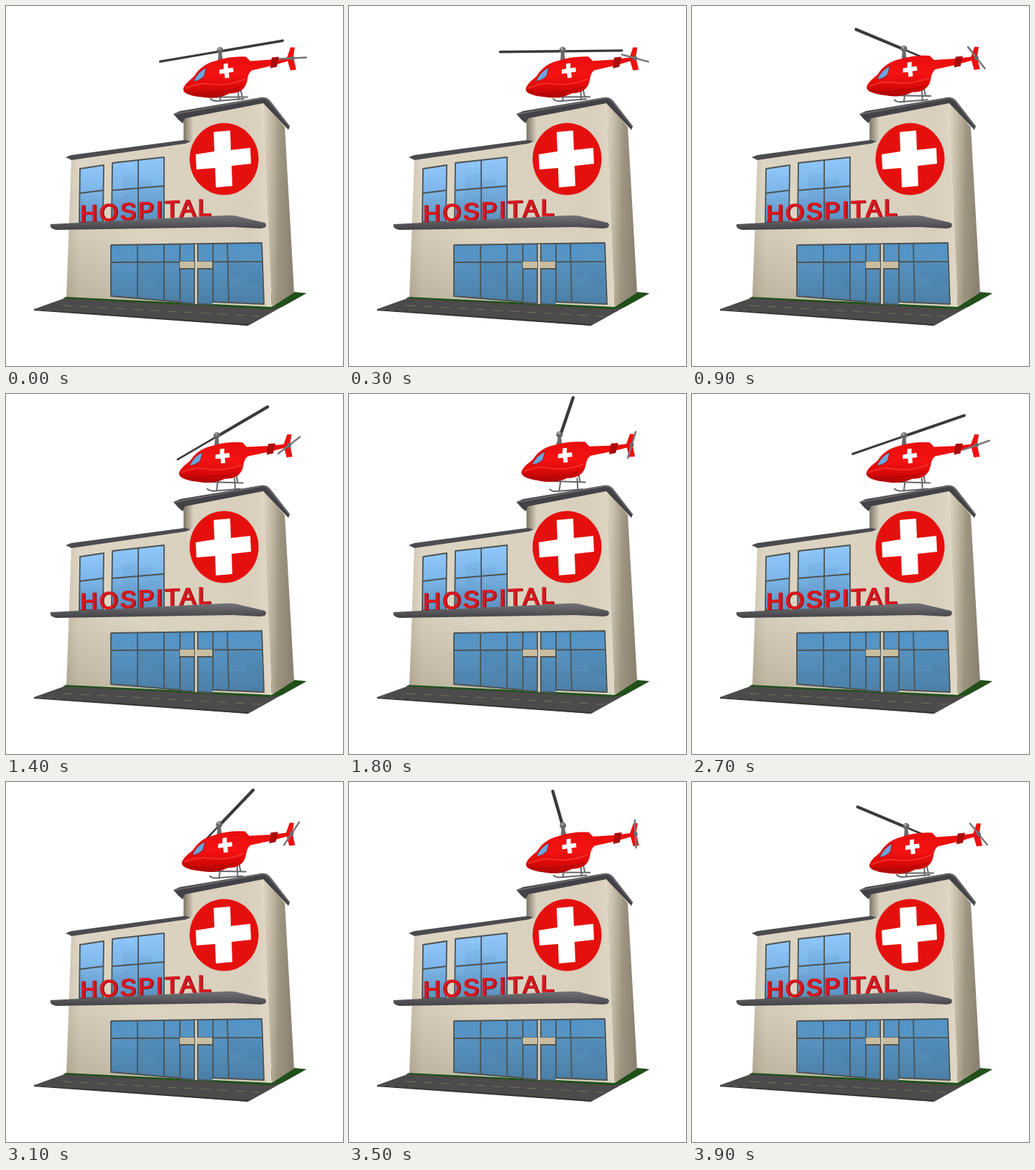
An HTML page for the animation above (4000 ms loop, 469 by 500 pixels).

```html
<!DOCTYPE html>
<html lang="en">
<head>
<meta charset="utf-8">
<title>Hospital helicopter</title>
<style>
  html, body { margin: 0; width: 100%; height: 100%; overflow: hidden; background: #fff; }
  svg { display: block; width: 469px; height: 500px; }
  .frame { fill: none; stroke: #4d5353; stroke-width: 1.8; stroke-linejoin: round; }
  .skid { fill: none; stroke: #66666a; stroke-width: 2; stroke-linecap: round; }
  .sign { font: 33px "Liberation Sans", Arial, sans-serif; letter-spacing: 3px; stroke-width: 1.2; }
</style>
</head>
<body>
<svg viewBox="0 0 469 500">
  <defs>
    <linearGradient id="wall">
      <stop offset="0" stop-color="#cdc4b0"/><stop offset=".06" stop-color="#ddd5c3"/>
      <stop offset=".9" stop-color="#d8cfbc"/><stop offset="1" stop-color="#e0d8c6"/>
    </linearGradient>
    <linearGradient id="side" y2=".12">
      <stop offset="0" stop-color="#e0d8c6"/><stop offset=".25" stop-color="#c9bfab"/>
      <stop offset=".6" stop-color="#9d9480"/><stop offset="1" stop-color="#8a8371"/>
    </linearGradient>
    <linearGradient id="corner">
      <stop offset="0" stop-color="#5d5648" stop-opacity=".75"/><stop offset="1" stop-color="#5d5648" stop-opacity="0"/>
    </linearGradient>
    <linearGradient id="dusk" y1="1" x2=".7" y2="0">
      <stop offset="0" stop-color="#6b6046" stop-opacity=".3"/><stop offset="1" stop-color="#6b6046" stop-opacity="0"/>
    </linearGradient>
    <linearGradient id="sky" x2="0" y2="1">
      <stop offset="0" stop-color="#92c8fb"/><stop offset=".45" stop-color="#7db6e9"/>
      <stop offset="1" stop-color="#5c92c0"/>
    </linearGradient>
    <linearGradient id="glass" x2="0" y2="1">
      <stop offset="0" stop-color="#5293c8"/><stop offset=".3" stop-color="#5894c2"/>
      <stop offset="1" stop-color="#4b7ea6"/>
    </linearGradient>
    <linearGradient id="slab" x2="0" y2="1">
      <stop offset="0" stop-color="#727277"/><stop offset=".5" stop-color="#5b5b60"/>
      <stop offset="1" stop-color="#424246"/>
    </linearGradient>
    <linearGradient id="red" x2="0" y2="1">
      <stop offset="0" stop-color="#e80d0d"/><stop offset=".45" stop-color="#f51212"/>
      <stop offset=".75" stop-color="#dc0909"/><stop offset="1" stop-color="#ad0505"/>
    </linearGradient>
  </defs>

  <path id="farSkid" class="skid" d="M288 126L336 126M294 117L292 126M326 113L329 126"/>
  <path id="nearSkid" class="skid" d="M285 129Q288 132 293 132L331 129M300 117L298 132M323 114L324 130"/>
  <g id="rotor" stroke="#3a3a3c" stroke-linecap="round">
    <line id="bladeA"/><line id="bladeB"/>
  </g>
  <g id="body">
    <path d="M296 62L295 75L302 75L300 62Z" fill="#6a6a6d"/>
    <circle cx="298" cy="61" r="4.500" fill="#66666a"/><circle cx="297" cy="59" r="2" fill="#a4a4a8"/>
    <path d="M391 72L396 57L402 57L400 71L404 88L396 89Z" fill="#ee1111"/>
    <path d="M247 114C250 106 257 102 262 97C268 87 278 79 291 76Q311 69 334 70L340 76L368 74L399 70L399 74L372 82L342 89Q337 93 336 102C334 115 325 121 311 121C298 128 284 128 272 126Q259 125 251 121Q246 118 247 114Z" fill="url(#red)"/>
    <path d="M250 114Q270 105 285 108Q309 111 333 101" fill="none" stroke="#ff5148" stroke-width="2" opacity=".5"/>
    <path d="M251 119Q276 125 292 118Q311 119 327 112" fill="none" stroke="#a60606" stroke-width="2" opacity=".5"/>
    <path d="M261 104Q267 90 279 85L276 97Q269 104 261 104Z" fill="#6ba5dc" stroke="#a81818"/>
    <path d="M370 71L380 70L377 84L368 86Z" fill="#a90b0b"/>
    <path d="M303 80L309 79L309 86L316 85L317 91L310 92L311 99L305 100L304 93L297 94L297 88L303 87Z" fill="#fff"/>
    <g id="tail" stroke-linecap="round">
      <line x1="-19" x2="19" stroke="#77777b" stroke-width="2.5"/><circle r="3" fill="#69696d"/>
    </g>
  </g>

  <path d="M39 421L84 405L404 398L418 399L337 444Z" fill="#4c4a4a"/>
  <path d="M39 421L337 442V444L39 423Z" fill="#353434"/>
  <path d="M80 416L354 431" stroke="#77715d" stroke-dasharray="13 11"/>
  <path d="M79 406L86 403L360 414L400 397L418 399L384 418L366 421Z" fill="#21501b"/>

  <path d="M91 211L248 189V154L357 132L370 418L84 404Z" fill="url(#wall)"/>
  <path d="M357 132L388 168L401 398L370 418Z" fill="url(#side)"/>
  <path d="M247 152L261 149V187L247 189Z" fill="url(#corner)"/>
  <path d="M88 310H210V409L84 404Z" fill="url(#dusk)"/>

  <path d="M83 210L91 207L249 186L257 188L250 191L91 214Z" fill="#4b4b50"/>
  <path d="M233 150L242 146L355 127Q363 126 368 132L395 167L393 172L358 135L249 156L246 163L240 158Z" fill="#424247"/>
  <path d="M235 150L355 128Q362 127 367 133L394 167" fill="none" stroke="#67676c" stroke-width="2"/>

  <ellipse cx="303.500" cy="212.500" rx="48" ry="50" fill="#e5100e"/>
  <path d="M289 175L312 173L313 200L340 197L341 219L314 222L315 250L292 252L291 225L265 227L264 206L290 202Z" fill="#fff"/>

  <g fill="url(#sky)">
    <path d="M103 226L136 221L135 300H102Z"/>
    <path d="M148 218L220 210V300H147Z"/>
  </g>
  <path d="M148 268L162 266V236L184 233V242L204 240V250L220 248V298H148Z" fill="#467aa5" opacity=".1"/>
  <path class="frame" d="M103 226L136 221L135 300H102ZM103 260L135 256M148 218L220 210V300H147ZM148 256L220 250M184 214V300"/>

  <g class="sign" transform="matrix(1 -.05 0 1 103 300)">
    <text x="1.500" y=".5" fill="#8d1014" stroke="#8d1014">HOSPITAL</text>
    <text fill="#d81920" stroke="#d81920">HOSPITAL</text>
  </g>

  <path d="M62 303L302 291Q317 290 326 293L360 301Q364 304 360 308L354 309L315 307L70 311Q60 309 62 303Z" fill="url(#slab)"/>

  <path d="M146 332L356 329L359 414L288 411V415L242 412L146 403Z" fill="url(#glass)"/>
  <path d="M184 356H220V391L205 386V378H184ZM310 357H355V390L334 385V376H310Z" fill="#376d98" opacity=".18"/>
  <path class="frame" d="M146 332L356 329L359 414L288 411V330M146 332V403L242 411V331M146 356L356 355M183 332V406M220 331V409M308 330L310 412M262 331V413M267 331V414M242 365H288M242 412L288 415"/>
  <path d="M263 331H266V414H263Z" fill="#d3c9b4"/>
  <path d="M242 355H262V364H242ZM266 355H287V364H266Z" fill="#c9bda0"/>
</svg>
<script>
  const LOOP = 4000, STEP = 100, TAU = 2 * Math.PI;
  const $ = id => document.getElementById(id);
  const wave = t => (1 - Math.cos(TAU * t / LOOP)) / 2;
  const place = (id, transform) => $(id).setAttribute("transform", transform);

  // Tip of a blade on the rotor disc, seen from below with a little perspective.
  function setBlade(line, angle, hub) {
    const depth = Math.sin(angle), x = 86 * Math.cos(angle);
    const zoom = 1 / (1 - 0.16 * depth);
    line.setAttribute("x1", hub.x);
    line.setAttribute("y1", hub.y);
    line.setAttribute("x2", hub.x + zoom * x);
    line.setAttribute("y2", hub.y - zoom * (43 * depth + 0.1 * x));
    line.setAttribute("stroke-width", 3.4 + depth);
  }

  function draw(t) {
    const drift = -5.5 * wave(t + 200), lift = wave(t - 50);
    const pose = `translate(${drift} ${0.5 - 2 * lift}) rotate(${2 * lift} 395 72)`;
    place("body", pose);
    place("farSkid", pose);
    place("nearSkid", `translate(${drift} ${3.5 * lift})`);

    const turn = 8 + 0.54 * t;
    const angle = turn * Math.PI / 180;
    const hub = { x: 298 + drift * 0.7, y: 63 - 6 * lift };
    setBlade($("bladeA"), angle, hub);
    setBlade($("bladeB"), angle + Math.PI, hub);
    place("tail", `translate(399 72) rotate(${5 - turn})`);
  }

  function tick() {
    draw(Math.floor(performance.now() % LOOP / STEP) * STEP);
    requestAnimationFrame(tick);
  }
  tick();
</script>
</body>
</html>
```
